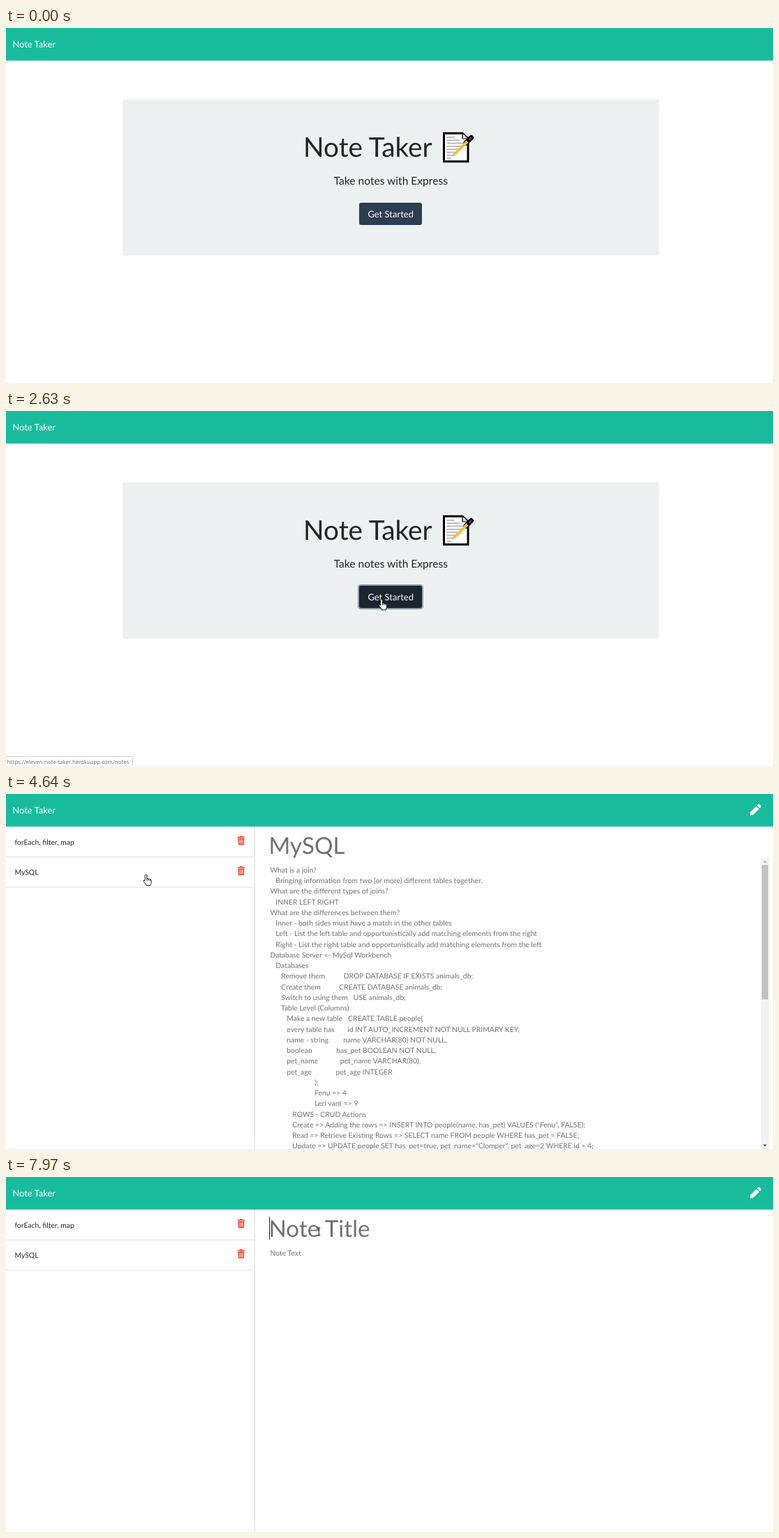
These frames come from a looping animation (1099 by 510 pixels, 8 s). An HTML page:

```html
<!DOCTYPE html>
<html lang="en">
<head>
<meta charset="utf-8">
<title>Note Taker</title>
<style>
html, body { margin: 0; width: 100%; height: 100%; overflow: hidden; background: #fff; }
svg { display: block; font-family: Lato, sans-serif; font-size: 10.39px; }
text { white-space: pre; text-rendering: geometricPrecision; }
.mid { text-anchor: middle; }
.note { fill: #717171; }
.head { font-size: 33.24px; }
</style>
</head>
<body>
<svg width="1099" height="510" viewBox="0 0 1099 510">
  <defs>
    <g id="trash">
      <path fill="#e74c3c" d="M.3.9H3.3L3.9 0H7.1L7.7.9H10.8V2.4H.3ZM1 3.3H10.2L9.7 12Q9.6 13 8.6 13H2.6Q1.6 13 1.5 12Z"/>
      <path stroke="#fff" stroke-width=".9" d="M3.5 4.9V11.3M5.6 4.9V11.3M7.7 4.9V11.3"/>
    </g>
  </defs>
  <rect width="1099" height="46.8" fill="#18bc9c"/>
  <text x="9.2" y="27.6" font-size="13" fill="#fff">Note Taker</text>

  <g id="home">
    <rect x="167" y="102.5" width="768.5" height="224.5" rx="3" fill="#ecf0f1"/>
    <text x="426" y="185" font-size="38.8" fill="#212529">Note Taker</text>
    <g fill="none" stroke-linecap="round">
      <path d="M627.5 151.2H654L662 159V191.8H627.5Z" fill="#fff" stroke="#000" stroke-width="3" stroke-linecap="butt"/>
      <path d="M654 151.2V159H662" fill="#ddd" stroke="#000" stroke-width="1.2"/>
      <path d="M632 157H642M632 161.3H650M632 165.6H655M632 169.9H654M632 174.2H649M632 178.5H645M632 182.8H640M632 187H637" stroke="#aaa" stroke-width="1.5"/>
      <path d="M659 165L666.5 157.5" stroke="#000" stroke-width="7"/>
      <path d="M664 160L666.5 157.5" stroke="#444" stroke-width="2.5"/>
      <path d="M643 181L661 163" stroke="#f8c03e" stroke-width="4" stroke-linecap="butt"/>
      <path d="M641.5 179.5L639 185L644.5 182.5Z" fill="#e0b483"/>
    </g>
    <text class="mid" x="551.3" y="225" font-size="15.58" fill="#212529">Take notes with Express</text>
    <rect id="ring" x="504" y="249" width="94" height="36" rx="4.5" fill="#4c5b6a" fill-opacity=".55"/>
    <rect id="button" x="506" y="251" width="90" height="32" rx="3"/>
    <text class="mid" x="551.2" y="271.5" font-size="13" fill="#fff">Get Started</text>
    <g id="status">
      <path d="M-1 496.5H179.5Q181.5 496.5 181.5 498.5V511H-1Z" fill="#fff" stroke="#d0d0d0"/>
      <text x="1.8" y="507.2" font-size="7.86" font-family="Open Sans, sans-serif" fill="#6b6b6b">https://eleven-note-taker.herokuapp.com/notes</text>
    </g>
  </g>

  <g id="notes">
    <path d="M356.5 47V510M0 90.5H356M0 134H356" stroke="#dfdfdf" fill="none"/>
    <g fill="#212529">
      <text x="12.4" y="72.8">forEach, filter, map</text>
      <text x="12.4" y="116.3">MySQL</text>
    </g>
    <use href="#trash" x="331.3" y="60.3"/>
    <use href="#trash" x="331.3" y="103.8"/>
    <path transform="translate(1065.8 14.2)" fill="#fff" d="M9.2 3.2L13.3 7.3 5 15.6.9 16.5Q0 16.6.1 15.6L1 11.4ZM10.3 2.1L11.8.6Q12.9-.4 14 .6L15.9 2.5Q17 3.6 15.9 4.7L14.4 6.2Z"/>
    <g id="blank" class="note"></g>
    <g id="arrays" class="note"></g>
    <g id="mysql" class="note">
      <path d="M1082 91H1093V510H1082Z" fill="#f1f1f1"/>
      <path d="M1083 102H1092V295H1083Z" fill="#c1c1c1"/>
      <path d="M1085 98.5H1090L1087.5 95.5Z" fill="#a3a3a3"/>
      <path d="M1085 503.5H1090L1087.5 506.5Z" fill="#505050"/>
    </g>
    <path id="caret" d="M377.5 57V90" stroke="#222" stroke-width="1"/>
  </g>

  <g id="pointer">
    <circle id="press" r="8.6" fill="#fff200" fill-opacity=".62"/>
    <g fill="#fff" stroke="#000" stroke-width=".9" stroke-linejoin="round">
      <path id="arrow" d="M.4.4V12L3 9.5 4.9 13.6 6.7 12.8 4.9 8.8H8.4Z"/>
      <path id="hand" d="M-1.4 9.2V1.4Q-1.4.2 0 .2T1.4 1.4V6Q3.2 5.4 3.6 6.6 5.4 6 5.8 7.2 7.6 6.8 7.7 8.6V11Q7.7 13 6.5 14.2V15.8H.2V14.4Q-2.6 11.5-3.7 9.3-3.4 7.4-1.4 9.2ZM1.4 6V9M3.6 6.6V9M5.8 7.2V9.2"/>
      <path id="beam" fill="none" d="M-2-5.5H2M0-5.5V5.5M-2 5.5H2"/>
    </g>
  </g>
</svg>
<script>
const LOOP = 8000, FRAME = 77.6, PHASE = 276;
const $ = id => document.getElementById(id);
const show = (id, on) => $(id).style.display = on ? '' : 'none';
const clamp = v => Math.max(0, Math.min(1, v));

function addText(parent, x, y, content, className = '') {
  const el = document.createElementNS('http://www.w3.org/2000/svg', 'text');
  el.setAttribute('x', x);
  el.setAttribute('y', y);
  el.setAttribute('class', className);
  el.textContent = content;
  parent.append(el);
}

function addNote(id, title, body) {
  addText($(id), 376.5, 86, title, 'head');
  body.split('\n').forEach((line, i) => addText($(id), 378.4, 112.8 + i * 15.25, line));
}

addNote('blank', 'Note Title', 'Note Text');
addNote('arrays', 'forEach, filter, map', `forEach
   Runs a function once for every element
filter
   Returns a new array with the elements that pass
   The function has to return true to keep an element in the result
map
   Returns a new array of the same length
   Each element is what the function returned`);
addNote('mysql', 'MySQL', `What is a join?
   Bringing information from two (or more) different tables together.
What are the different types of joins?
   INNER LEFT RIGHT
What are the differences between them?
   Inner - both sides must have a match in the other tables
   Left - List the left table and opportunistically add matching elements from the right
   Right - List the right table and opportunistically add matching elements from the left
Database Server <- MySql Workbench
   Databases
      Remove them          DROP DATABASE IF EXISTS animals_db;
      Create them          CREATE DATABASE animals_db;
      Switch to using them   USE animals_db;
      Table Level (Columns)
         Make a new table   CREATE TABLE people(
         every table has       id INT AUTO_INCREMENT NOT NULL PRIMARY KEY,
         name - string        name VARCHAR(80) NOT NULL,
         boolean             has_pet BOOLEAN NOT NULL,
         pet_name            pet_name VARCHAR(80),
         pet_age             pet_age INTEGER
                        );
                        Fenu => 4
                        Leri vant => 9
            ROWS - CRUD Actions
            Create => Adding the rows => INSERT INTO people(name, has_pet) VALUES ("Fenu", FALSE);
            Read => Retrieve Existing Rows => SELECT name FROM people WHERE has_pet = FALSE;
            Update => UPDATE people SET has_pet=true, pet_name="Clomper", pet_age=2 WHERE id = 4;`);

// Pointer path: time, x, y
const path = [
  [276, 720, 495], [450, 560, 400], [600, 350, 255], [750, 180, 150], [897, 102.5, 95],
  [1052, 75, 43], [1129, 67, 34], [1290, 80, 45], [1520, 260, 150], [1750, 470, 250],
  [1905, 541, 275], [1980, 538, 270], [2760, 538, 270], [2860, 528, 262], [3170, 380, 165],
  [3400, 250, 90], [3530, 222, 75.5], [3850, 222, 75.5], [4310, 200.5, 115.5],
  [5010, 200.5, 115.5], [5325, 1010, 20], [5630, 1084, 20], [5785, 1074, 17.5],
  [7255, 1074, 17.5], [7335, 1060, 35], [7600, 760, 118], [7800, 520, 95], [7950, 448.5, 78.5]
];
const presses = [[2460, 2630], [3650, 3790], [4560, 4640], [6960, 7110]];

function pointerAt(t) {
  const i = path.findIndex(p => p[0] > t);
  if (i < 1) return path.at(i).slice(1);
  const [t0, x0, y0] = path[i - 1], [t1, x1, y1] = path[i];
  const k = (t - t0) / (t1 - t0);
  return [x0 + (x1 - x0) * k, y0 + (y1 - y0) * k];
}

function cursorKind(x, y, home) {
  if (home) return x > 506 && x < 596 && y > 251 && y < 283 ? 'hand' : 'arrow';
  if (y < 47) return x > 1065 && x < 1082 ? 'hand' : 'arrow';
  if (x < 356) return y < 134 ? 'hand' : 'arrow';
  return x > 376 ? 'beam' : 'arrow';
}

function draw(t) {
  const home = t < 2780;
  show('home', home);
  show('notes', !home);

  const hover = clamp((t - 1880) / 150), active = t >= 2460;
  $('button').setAttribute('fill', active ? '#1a252f'
    : `rgb(${44 - 14 * hover},${62 - 19 * hover},${80 - 25 * hover})`);
  $('ring').style.opacity = clamp((t - 2430) / 150);
  $('status').style.opacity = clamp((t - 1950) / 200);

  const note = t >= 3790 && t < 4640 ? 'arrays' : t >= 4640 && t < 7110 ? 'mysql' : 'blank';
  for (const id of ['blank', 'arrays', 'mysql']) show(id, id === note);
  show('caret', t >= 7880);

  const step = PHASE + Math.floor((t - PHASE) / FRAME) * FRAME;
  const [x, y] = pointerAt(step);
  const kind = cursorKind(x, y, home);
  show('pointer', t >= 290 && !(step > 5390 && step < 5630));
  $('pointer').setAttribute('transform', `translate(${x} ${y})`);
  for (const id of ['arrow', 'hand', 'beam']) show(id, id === kind);
  show('press', presses.some(([from, to]) => t >= from && t < to));
}

const start = performance.now();
function tick() {
  draw((performance.now() - start) % LOOP);
  requestAnimationFrame(tick);
}
tick();
</script>
</body>
</html>
```
